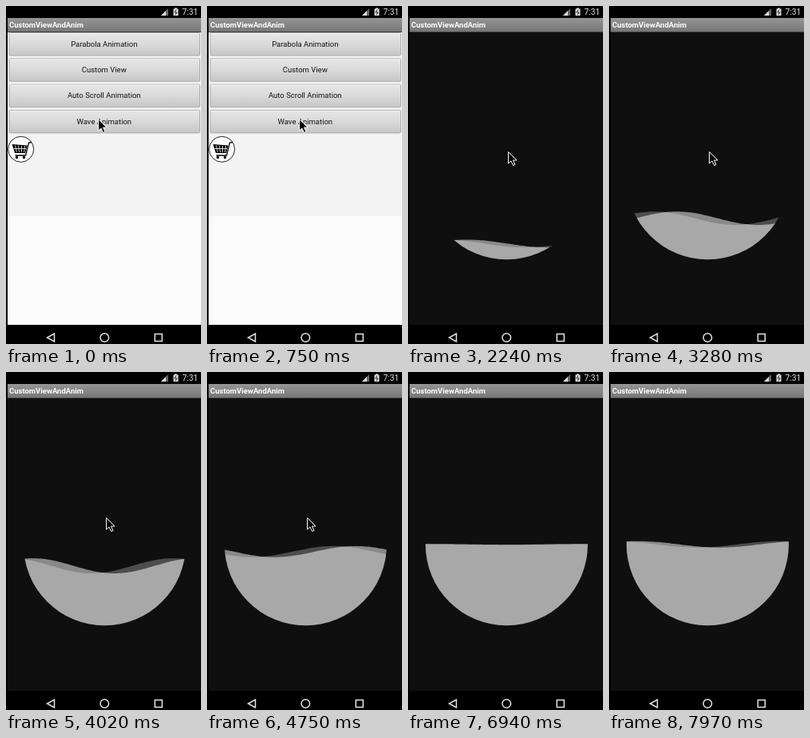
An HTML page that plays this animation: 244 by 423 pixels, repeating every 8000 ms.

```html
<!DOCTYPE html>
<html lang="en">
<head>
<meta charset="utf-8">
<title>Wave view demo</title>
<style>
  html, body { margin: 0; width: 100%; height: 100%; overflow: hidden; background: #000; }
  svg { display: block; width: 244px; height: 423px; font: 9.5px Roboto, sans-serif; }
  .title { font-weight: bold; fill: #fff; }
  .label { text-anchor: middle; fill: #111; }
  .line { fill: none; stroke: #e4e4e4; stroke-width: 1.5; }
</style>
</head>
<body>
<svg viewBox="0 0 244 423">
  <defs>
    <linearGradient id="bar" x2="0" y2="1">
      <stop stop-color="#959595"/><stop offset="1" stop-color="#767676"/>
    </linearGradient>
    <linearGradient id="button" x2="0" y2="1">
      <stop stop-color="#e6e6e6"/><stop offset=".5" stop-color="#dadada"/><stop offset="1" stop-color="#c6c6c6"/>
    </linearGradient>
    <linearGradient id="pressed" x2="0" y2="1">
      <stop stop-color="#ffc04a"/><stop offset="1" stop-color="#f08a00"/>
    </linearGradient>
    <clipPath id="bowl"><circle cx="123.4" cy="215.8" r="101.5"/></clipPath>
    <clipPath id="screen"><rect x="2" y="15" width="242" height="384"/></clipPath>
  </defs>
  <rect width="244" height="423"/>

  <g clip-path="url(#screen)">
    <g id="menu">
      <rect x="2" y="33" width="242" height="230" fill="#f3f3f3"/>
      <rect x="2" y="263" width="242" height="136" fill="#fbfbfb"/>
      <g id="buttons"></g>
      <circle cx="18.7" cy="179.3" r="16" fill="#fff" stroke="#222"/>
      <path d="M7.5 173L26.500 174.500L24 184H11Z"/>
      <path d="M11.500 174.500L13.500 183M15.500 174.500L16.500 183M19.500 175L19.500 183M23.500 175L22.500 183M9.500 178.500H25" stroke="#fff" stroke-width=".8"/>
      <path d="M32 170.500L28.500 171L24.500 187H11.500" fill="none" stroke="#000" stroke-width="1.3"/>
      <circle cx="13.500" cy="189.500" r="1.700"/><circle cx="22.500" cy="189.500" r="1.700"/>
    </g>
    <g id="wavePage">
      <rect x="2" y="15" width="242" height="390" fill="#0f0f0f"/>
      <rect id="fade" x="2" y="244" width="242" height="160" fill="#121212"/>
      <g clip-path="url(#bowl)" fill="#fff">
        <path id="back" fill-opacity=".26"/>
        <path id="front" fill-opacity=".51"/>
      </g>
    </g>
    <rect id="titleBar" x="2" y="15" width="242" height="17.500" fill="url(#bar)"/>
    <text id="title" class="title" x="4" y="27">CustomViewAndAnim</text>
  </g>

  <path d="M194 12L203 3V12Z" fill="#666"/><path d="M194 12L200 6V12Z" fill="#ddd"/>
  <path d="M209.500 3.500H211V2.500H214V3.500H215.500V12H209.500Z" fill="#ddd"/>
  <path d="M213 4.500L211 8H214L212 11" fill="none" stroke="#222"/>
  <text x="220.500" y="11" font-size="10.200" fill="#e4e4e4">7:31</text>
  <path class="line" d="M60.500 410V420L51.500 415Z"/>
  <circle class="line" cx="123.300" cy="415" r="5.300"/>
  <rect class="line" x="186.300" y="410.500" width="9" height="9"/>

  <path id="cursor" d="M0 0V14.500L3.500 11.500L6 17L8.500 16L6 10.500H10.500Z" fill="#000" stroke="#fff" stroke-linejoin="round"/>
</svg>
<script>
const LOOP = 8000, PAGE_OPEN = 1350, WAVE_START = 800;
const LEFT = 21, RIGHT = 226, WIDTH = 203, BOTTOM = 317.3, RISE = 101.6;
const bursts = [PAGE_OPEN, 2540, 3720, 4890, 6060, 7230];
const cursorKeys = [
  [0, 115, 141], [1500, 115, 141], [2100, 125, 182],
  [5200, 125, 182], [5900, 221, 275], [6500, 246, 424]
];
const $ = id => document.getElementById(id);
const show = (id, on) => $(id).setAttribute('display', on ? 'inline' : 'none');
const clamp = v => Math.min(1, Math.max(0, v));

$('buttons').innerHTML = ['Parabola Animation', 'Custom View', 'Auto Scroll Animation', 'Wave Animation']
  .map((label, i) => {
    const y = 33.5 + i * 32.3;
    return `<rect x="4" y="${y}" width="238.5" height="28.5" rx="1.5" fill="url(#button)" stroke="#aaa"/>
      <path d="M5 ${y + 1}H241.5" stroke="#f4f4f4"/>
      <text class="label" x="122.8" y="${y + 17.3}">${label}</text>`;
  }).join('');
const waveButton = $('buttons').querySelector('rect:last-of-type');

// The screen refreshes in steps of about 147 ms.
function stepTime(t) {
  const start = bursts.filter(b => b <= t).pop();
  if (start === undefined) return t;
  return start + Math.min(7, Math.floor((t - start) / 145.7)) * 147.5;
}

function cursorAt(t) {
  const i = cursorKeys.findIndex(k => k[0] > t);
  if (i < 0) return null;
  const [t0, x0, y0] = cursorKeys[i - 1], [t1, x1, y1] = cursorKeys[i];
  const u = (t - t0) / (t1 - t0);
  return [x0 + (x1 - x0) * u, y0 + (y1 - y0) * u];
}

function wavePath(level, amplitude, crest) {
  let d = `M${LEFT} 330`;
  for (let x = LEFT; x <= RIGHT; x += 2.5) {
    const y = level - amplitude * Math.cos((x - crest) / WIDTH * 2 * Math.PI);
    d += `L${x} ${y.toFixed(2)}`;
  }
  return d + `V330Z`;
}

function drawWaves(t) {
  const rise = (1 - Math.cos(Math.PI * clamp((t - WAVE_START) / 4900))) / 2;
  const level = BOTTOM - RISE * rise;
  const cycle = ((t - WAVE_START) / 3000) % 2;
  const amplitude = 10.15 * (1 - Math.abs(1 - cycle));
  const crest = 60 + (t - 2240) / 985 * WIDTH;
  $('back').setAttribute('d', wavePath(level, amplitude, crest - 14));
  $('front').setAttribute('d', wavePath(level, amplitude, crest + 14));
}

function render(now) {
  const t = stepTime(now);
  const open = now >= PAGE_OPEN, sliding = open && t < 1490;
  const offset = sliding ? 2.7 : 0;
  show('menu', !open);
  show('wavePage', open);
  show('fade', sliding);
  waveButton.setAttribute('fill', now >= 600 && now < 750 ? 'url(#pressed)' : 'url(#button)');
  $('wavePage').setAttribute('transform', `translate(0 ${offset})`);
  $('titleBar').setAttribute('height', 17.5 + offset);
  $('title').setAttribute('y', 27 + offset);
  if (open) drawWaves(t);
  const pos = cursorAt(t);
  show('cursor', pos);
  if (pos) $('cursor').setAttribute('transform', `translate(${pos[0] + .5} ${pos[1] + .5})`);
}

function tick() {
  render(performance.now() % LOOP);
  requestAnimationFrame(tick);
}
tick();
</script>
</body>
</html>
```
